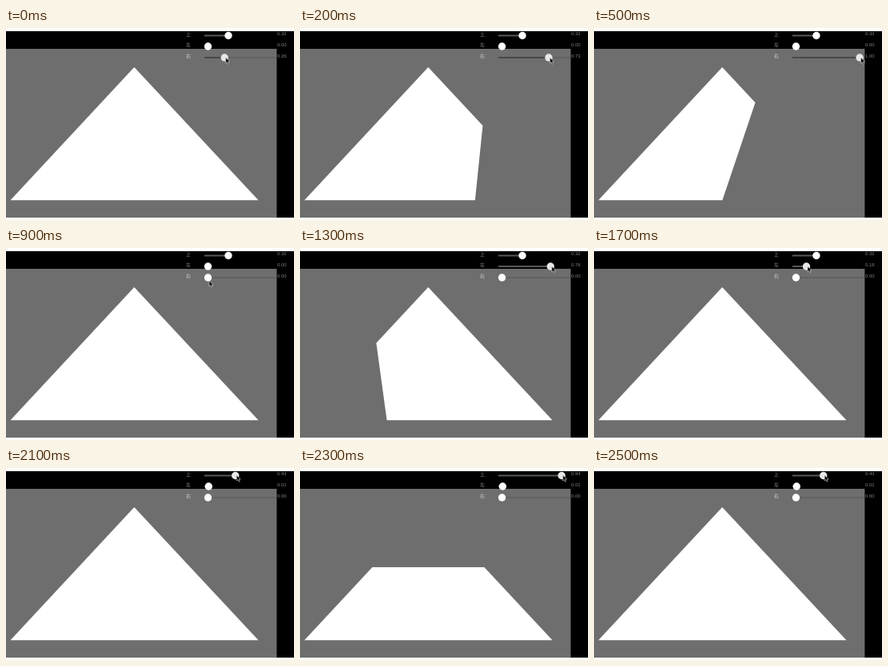
Write an HTML page with a canvas that moves like this. It is 360 px wide and 240 px high and loops after 2600 ms.

```html
<!DOCTYPE html>
<html lang="ja">
<head>
<meta charset="utf-8">
<style>
html, body { margin: 0; width: 360px; height: 240px; overflow: hidden; background: #fff; }
canvas { display: block; }
</style>
</head>
<body>
<canvas id="stage" width="360" height="240"></canvas>
<script>
const ctx = document.getElementById('stage').getContext('2d');
const LOOP = 2600, STEP = 100;

const clamp = (v, lo, hi) => Math.min(hi, Math.max(lo, v));
const mix = (a, b, k) => a + (b - a) * k;
const between = (p, q, k) => [mix(p[0], q[0], k), mix(p[1], q[1], k)];
const knobX = v => 252.5 + 79.6 * v;

function rect(color, x, y, w, h) {
  ctx.fillStyle = color;
  ctx.fillRect(x, y, w, h);
}

function polygon(points, color) {
  ctx.beginPath();
  points.forEach(p => ctx.lineTo(...p));
  ctx.closePath();
  ctx.fillStyle = color;
  ctx.fill();
}

// A bottom corner, cut off once its slider passes the threshold
function corner(point, apex, opposite, v) {
  const base = clamp(.724 * (v - .303), 0, .5);
  if (!base) return [point];
  const side = Math.min(.734, .579 + .68 * (v - .76));
  return [between(point, apex, side), between(point, opposite, base)];
}

function drawShape(top, left, right) {
  const a = [160.3, 49], l = [5.5, 215.3], r = [315.5, 215.3];
  const cut = clamp((top - .45) / .55, 0, 1) * .51;
  polygon([
    between(a, l, cut), between(a, r, cut),
    ...corner(r, a, l, right),
    ...corner(l, a, r, left).reverse()
  ], '#fff');
}

function drawSlider(label, v, y, active, labelColor) {
  const x = knobX(v);
  rect('rgba(0,0,0,.22)', 248, y - .5, 90, 1);
  rect(y > 30 ? '#484848' : '#585858', 248, y - 1, x - 248, 2);
  ctx.beginPath();
  ctx.arc(x, y, 4.7, 0, 7);
  ctx.fillStyle = active ? '#e8e8e8' : '#fff';
  ctx.fill();
  ctx.fillStyle = labelColor;
  ctx.font = '6px "Noto Sans CJK JP", "Noto Sans CJK", sans-serif';
  ctx.fillText(label, 225, y);
  ctx.fillStyle = '#808080';
  ctx.font = '6px "Liberation Sans", Arial, sans-serif';
  ctx.fillText(v.toFixed(2), 339, y - .2);
}

function drawCursor(x, y) {
  const shape = [[0, 0], [0, 7], [1.6, 5.6], [2.8, 8.2], [4, 7.6], [2.9, 5.1], [5, 5]];
  ctx.save();
  ctx.translate(x, y);
  polygon(shape, '#000');
  ctx.strokeStyle = '#ddd';
  ctx.lineWidth = .6;
  ctx.stroke();
  ctx.restore();
}

function draw(now) {
  const t = Math.floor(now % LOOP / STEP) * STEP;
  // Progress of one drag, slowing towards its end
  const ease = (from, to) => 1 - (1 - clamp((t - from) / (to - from), 0, 1)) ** 2;

  const right = .26 + .74 * ease(0, 500) - ease(500, 700);
  const left = .97 * ease(1155, 1425) - .96 * ease(1550, 1800);
  const top = .32 + .11 * ease(2000, 2100) + .57 * (ease(2100, 2400) - ease(2400, 2500));
  const held = t < 1000 ? right : t < 1900 ? left : top;
  const cursorY = 37 + 4 * ease(700, 900) - 18 * ease(900, 1100) - 14 * ease(1800, 2000);

  rect('#fff', 0, 0, 360, 240);
  rect('#000', 0, 4, 360, 233);
  rect('#6e6e6e', 0, 26, 338.4, 211);
  drawShape(top, left, right);
  drawSlider('上', top, 9.5, t > 2000, '#888');
  drawSlider('左', left, 23, t > 1100 && t < 1900, '#888');
  drawSlider('右', Math.max(0, right), 37, t < 800, '#ccc');
  drawCursor(knobX(held) + 1.5, cursorY);
}

const start = performance.now();
function tick() {
  draw(performance.now() - start);
  requestAnimationFrame(tick);
}
tick();
</script>
</body>
</html>
```
